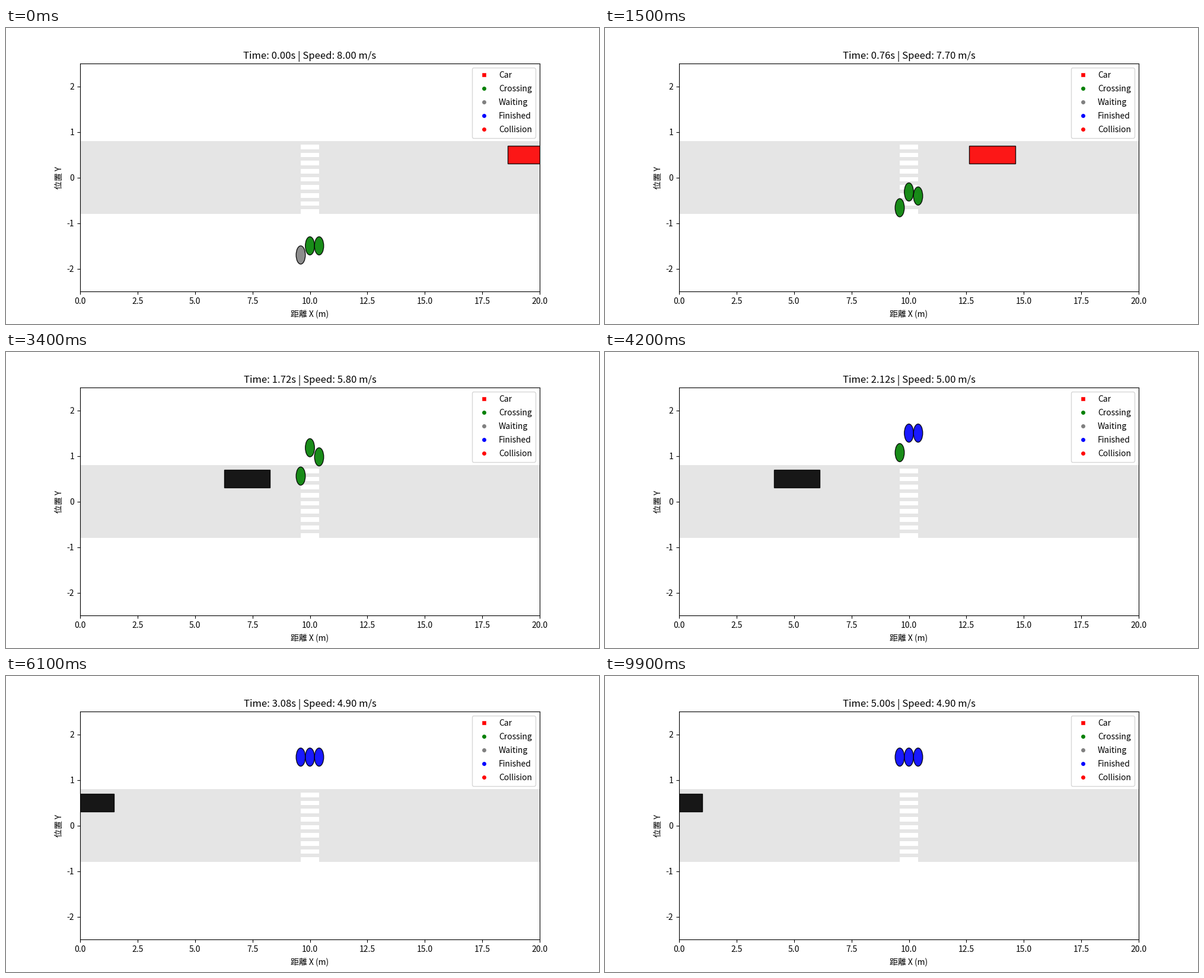
Animation, 1000 px wide and 500 px high, one loop 10000 ms. Source, as a matplotlib script:

```python
import matplotlib.pyplot as plt
from matplotlib.animation import FuncAnimation
from matplotlib.lines import Line2D
from matplotlib.patches import Ellipse, Rectangle

plt.rcParams["font.family"] = ["Noto Sans CJK JP"]
plt.rcParams["axes.unicode_minus"] = False

FRAMES = 100
DT = 0.05
CAR_W, CAR_H, CAR_Y = 2.0, 0.4, 0.5
START_Y, END_Y = -1.5, 1.5

# x position, climb per frame, frames spent waiting
WALKERS = [(9.6, 0.0643, 2), (10.0, 0.0788, 0), (10.4, 0.0729, 0)]


def drive():
    """Car position and speed per frame; it brakes near the crossing."""
    x, speed, path = 20.0, 8.0, []
    for _ in range(FRAMES):
        if abs(x - 10) < 5:
            speed -= 0.1
        x = max(0.0, x - speed * DT)
        path.append((x, speed))
    return path


def walk(frame, climb, wait):
    if frame < wait:
        return START_Y - 0.2, "gray"
    y = START_Y + climb * (frame - wait)
    return (END_Y, "blue") if y >= END_Y else (y, "green")


def is_hit(car_x, x, y):
    return abs(car_x - x) < 0.195 and abs(y - CAR_Y) < 0.5


PATH = drive()
FIRST_HIT = next(
    n for n in range(FRAMES)
    if any(is_hit(PATH[n][0], x, walk(n, climb, wait)[0])
           for x, climb, wait in WALKERS))

fig, ax = plt.subplots(figsize=(10, 5), dpi=100)
ax.set_xlim(0, 20)
ax.set_ylim(-2.5, 2.5)
ax.set_xlabel("距離 X (m)", labelpad=5)
ax.set_ylabel("位置 Y")
title = ax.set_title("")

# Road and zebra crossing
ax.add_patch(Rectangle((0, -0.8), 20, 1.6, fc="gray", ec="none", alpha=0.2))
for i in range(9):
    ax.add_patch(Rectangle((9.6, -0.8 + i * 1.6 / 9), 0.8, 0.1,
                           fc="white", ec="none"))

car = ax.add_patch(Rectangle((0, CAR_Y - CAR_H / 2), CAR_W, CAR_H,
                             fc="red", ec="black", lw=1, alpha=0.9))
people = [ax.add_patch(Ellipse((x, START_Y), 0.4, 0.4, fc="green",
                               ec="black", lw=1, alpha=0.9))
          for x, _, _ in WALKERS]


def key(label, color, marker="o"):
    return Line2D([0], [0], marker=marker, color="w",
                  markerfacecolor=color, label=label)


ax.legend(handles=[key("Car", "red", "s"), key("Crossing", "green"),
                   key("Waiting", "gray"), key("Finished", "blue"),
                   key("Collision", "red")],
          loc="upper right", labelspacing=0.65, borderpad=0.45)


def update(frame):
    car_x, speed = PATH[frame]
    car.set_x(car_x - CAR_W / 2)
    car.set_facecolor("black" if frame >= FIRST_HIT else "red")
    for person, (x, climb, wait) in zip(people, WALKERS):
        y, color = walk(frame, climb, wait)
        person.set_center((x, y))
        person.set_facecolor("red" if is_hit(car_x, x, y) else color)
    seconds = 5 * frame / (FRAMES - 1)
    title.set_text(f"Time: {seconds:.2f}s | Speed: {speed:.2f} m/s")
    return [car, *people, title]


anim = FuncAnimation(fig, update, frames=FRAMES, interval=100,
                     repeat=True, repeat_delay=0, blit=False)
plt.show()
```
